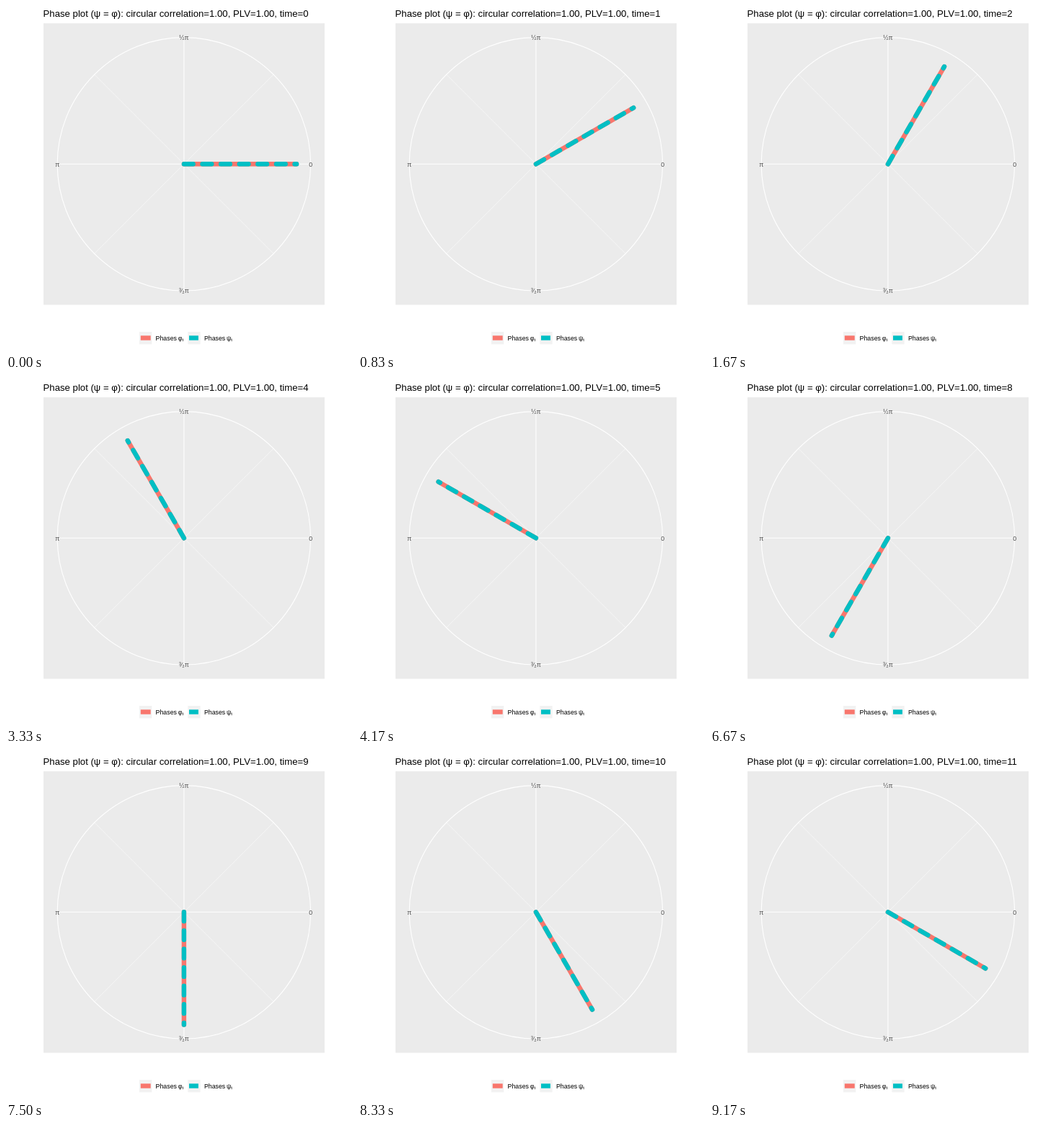
An HTML page that plays this animation: 480x480 px, repeating every 10000 ms.

```html
<!DOCTYPE html>
<html lang="en">
<head>
<meta charset="utf-8">
<title>Phase plot</title>
<style>
  html, body { margin: 0; width: 100%; height: 100%; overflow: hidden; background: #fff; }
  svg { display: block; width: 100%; height: 100%; }
  text { font-family: "Liberation Sans", Arial, sans-serif; font-size: 8.8px; }
  .title { font-size: 13.2px; }
  .axis { fill: #4d4d4d; text-anchor: middle; }
  .sub { font-size: 6.2px; }
  .grid { fill: none; stroke: #fff; stroke-width: 1.07; }
  .minor { stroke-width: .53; }
  .phi { stroke: #f8766d; }
  .psi { stroke: #00bfc4; }
  .arm, .key { stroke-width: 6.4; }
  .arm { stroke-linecap: round; }
  .arm.psi { stroke-dasharray: 12.8; }
</style>
</head>
<body>
<svg viewBox="0 0 480 480">
  <text id="title" class="title" x="51.5" y="15.2"></text>
  <rect x="52" y="24" width="390" height="390.5" fill="#ebebeb"/>

  <g transform="translate(246.9 219.3)">
    <path class="grid minor" d="M-124.2-124.2 124.2 124.2M-124.2 124.2 124.2-124.2"/>
    <path class="grid" d="M-175.7 0H175.7M0-175.7V175.7"/>
    <circle class="grid" r="175.7"/>
    <g id="arms">
      <path class="arm phi" d="M0 0H156.2"/>
      <path class="arm psi" d="M0 0H156.2"/>
    </g>
    <g class="axis">
      <text x="175.7" y="3.2">0</text>
      <text x="0" y="-172.5">½π</text>
      <text x="-175.7" y="3.2">π</text>
      <text x="0" y="178.9">³⁄₂π</text>
    </g>
  </g>

  <g fill="#f2f2f2">
    <rect x="185" y="452" width="17.3" height="17.3"/>
    <rect x="252.3" y="452" width="17.3" height="17.3"/>
  </g>
  <path class="key phi" d="M186.8 460.5h13.9"/>
  <path class="key psi" d="M254 460.5h12.9"/>
  <text y="463.7"><tspan x="207.6">Phases</tspan><tspan x="238.7">φ</tspan><tspan class="sub" x="244.6" dy="1.5">t</tspan></text>
  <text y="463.7"><tspan x="274.9">Phases</tspan><tspan x="306">ψ</tspan><tspan class="sub" x="312.2" dy="1.5">t</tspan></text>
</svg>
<script>
  const LOOP = 10000, STEPS = 12;
  const title = document.getElementById("title");
  const arms = document.getElementById("arms");

  // Step changes fall on whole hundredths of a second.
  const startOf = k => Math.round(k * LOOP / STEPS / 10) * 10;

  function stepAt(ms) {
    const next = Math.floor(ms * STEPS / LOOP) + 1;
    return startOf(next) <= ms ? next : next - 1;
  }

  let shown = -1;
  function draw(ms) {
    const step = stepAt(ms % LOOP);
    if (step === shown) return;
    shown = step;
    title.textContent = `Phase plot (ψ = φ): circular correlation=1.00, PLV=1.00, time=${step}`;
    arms.setAttribute("transform", `rotate(${-step * 360 / STEPS})`);
  }

  const begin = performance.now();
  function tick() {
    draw(performance.now() - begin);
    requestAnimationFrame(tick);
  }
  tick();
</script>
</body>
</html>
```
